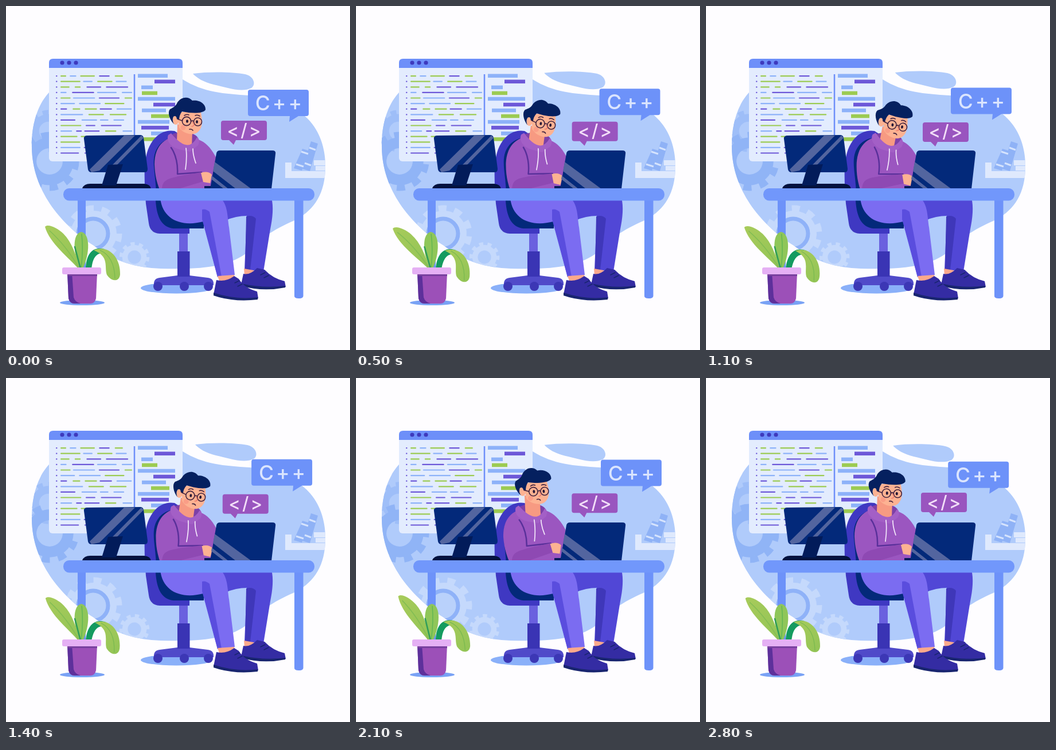
These frames come from a looping animation (600x600 px, 2900 ms). An HTML page:

```html
<!DOCTYPE html>
<html lang="en">
<head>
<meta charset="utf-8">
<title>Programmer at a desk</title>
<style>
  html, body { margin: 0; width: 100%; height: 100%; overflow: hidden; background: #fefdff; }
  svg { display: block; width: 100vw; height: 100vh; }
  text { font-family: Inter, "Liberation Sans", sans-serif; font-weight: 500; text-anchor: middle; }
  .line { fill: none; stroke-linecap: round; stroke-linejoin: round; }
</style>
</head>
<body>
<svg viewBox="0 0 600 600">
  <defs>
    <path id="blob" d="M45 247C44 198 61 143 112 128C175 105 255 108 308 128C345 151 380 153 425 156C528 166 557 223 557 280C557 330 535 358 503 374C462 392 447 404 418 432C382 458 330 459 270 458C215 456 182 440 152 417C98 383 46 323 45 247Z"/>
    <clipPath id="inBlob"><use href="#blob"/></clipPath>
    <g id="gear" fill="none" stroke="currentColor">
      <circle r="31" stroke-width="18"/>
      <circle r="44" stroke-width="11" pathLength="20" stroke-dasharray="1 1"/>
    </g>
    <linearGradient id="leafFill" x1="0" y1="0" x2="1" y2="1">
      <stop offset="0" stop-color="#a8cb5b"/><stop offset="1" stop-color="#92c456"/>
    </linearGradient>
  </defs>

  <use href="#blob" fill="#b0cbfb"/>
  <g clip-path="url(#inBlob)">
    <g transform="translate(74 218) scale(.74)" color="#9ebef8"><use href="#gear" class="gear" data-turn="-36"/></g>
    <g transform="translate(76 271) scale(1.04)" color="#90b4f6"><use href="#gear" class="gear" data-turn="36"/></g>
    <g transform="translate(153 397)" color="#c5d9fc"><use href="#gear" class="gear" data-turn="36"/></g>
    <circle cx="152" cy="397" r="26" fill="#b9d1fb" stroke="#8fb2f8" stroke-width="7"/>
    <g transform="translate(224 438) scale(.53)" color="#c5d9fc"><use href="#gear" class="gear" data-turn="-36"/></g>
    <g fill="#dfe9fd">
      <path d="M487 273H498V288H560V300H487Z"/>
      <path d="M537 269H560V278H537ZM540 279H560V287H540Z"/>
      <g fill="#8fb2f6">
        <path d="M517 249L530 253L516 287L502 283Z"/>
        <path d="M532 236L544 240L530 288L517 284Z"/>
      </g>
      <path d="M515 254L527 258M506 276L519 280M529 247L540 251M521 274L532 278" stroke="#d5e3fd" stroke-width="3"/>
    </g>
  </g>
  <path id="cloud" d="M326 118C355 114 397 115 417 119C432 122 437 137 428 143C410 152 382 141 362 137C345 133 332 125 326 118Z" fill="#b0cbfb"/>

  <rect x="75" y="96" width="233" height="175" rx="6" fill="#e3ecfe"/>
  <path d="M75 108V99Q75 92 82 92H301Q308 92 308 99V108Z" fill="#6d8ff9"/>
  <g fill="#3e3abd"><circle cx="98" cy="99" r="3.6"/><circle cx="110" cy="99" r="3.6"/><circle cx="122" cy="99" r="3.6"/></g>
  <path d="M224 119V260" stroke="#6d8ff9" stroke-width="2.5"/>
  <g id="code"></g>

  <g id="bigBubble">
    <path d="M426 146H524Q528 146 528 150V188Q528 192 524 192H510L494 202L495 192H426Q422 192 422 188V150Q422 146 426 146Z" fill="#6d92f9"/>
    <text x="477.5" y="182" font-size="35.5" letter-spacing="4" fill="#dbe5fe">C++</text>
  </g>
  <g id="smallBubble">
    <path d="M379 200H451Q455 200 455 204V230Q455 234 451 234H401L397 242L389 234H379Q375 234 375 230V204Q375 200 379 200Z" fill="#9955bf"/>
    <text x="416.5" y="227.5" font-size="31" letter-spacing="3" fill="#f2def8">&lt;/&gt;</text>
  </g>

  <!-- chair -->
  <ellipse cx="297" cy="492" rx="62" ry="9.5" fill="#8ab0f9"/>
  <path d="M302 392H317V432H302Z" fill="#6a60df"/>
  <path d="M258 487Q257 475 268 474L299 470H320L352 474Q363 475 362 487Z" fill="#504ac9"/>
  <rect x="299" y="428" width="21.500" height="44" fill="#3a34b4"/>
  <g fill="#3c37b5"><circle cx="265" cy="489" r="8"/><circle cx="311" cy="489" r="8"/><circle cx="353" cy="489" r="8"/></g>
  <path d="M244 345C241 302 239 268 250 245C260 224 277 215 294 218L320 235V397H268Q251 396 249 379Z" fill="#3f38c2"/>
  <path d="M261 340C265 305 251 273 262 251C268 238 281 229 297 230L310 240L345 376V388H292C272 386 263 369 261 340Z" fill="#03297a"/>

  <!-- person -->
  <g id="torsoBack"><path d="M284 232C284 216 336 215 336 235L320 252Z" fill="#7d40a7"/></g>
  <g id="head">
    <path d="M299 206L325 217L324 246Q309 253 298 236Z" fill="#f79a82"/>
    <path d="M298 186L339 181Q345 207 338 216C330 229 309 223 302 212Z" fill="#fdb292"/>
    <ellipse cx="296" cy="199" rx="5.5" ry="8" fill="#fdb292"/>
    <path d="M293 206C286 199 281 186 286 180C292 177 296 175 299 168C306 158 318 157 325 165C336 163 349 170 348 181C344 187 331 187 319 186L307 184Q302 190 302 199L298 197Q297 190 292 193Q289 199 293 206Z" fill="#05205f"/>
    <circle cx="309" cy="212" r="4.500" fill="#f89583" opacity=".7"/>
    <g class="line" stroke="#40233f" stroke-width="1.600">
      <circle cx="315" cy="201" r="7.600"/><circle cx="334.500" cy="202" r="7"/>
      <path d="M323 201Q325 199 327 201M307 200L299 197"/>
      <path d="M311 191Q315 188 319 190M330 191Q334 189 338 192"/>
      <path d="M320 215Q324 214 326 217"/>
    </g>
    <path d="M325 202Q331 209 324 210" class="line" stroke="#ef806e" stroke-width="1.600"/>
    <g fill="#261936"><ellipse cx="316" cy="201" rx="2" ry="2.800"/><ellipse cx="333" cy="202" rx="2" ry="2.800"/></g>
  </g>
  <g id="torso">
    <path d="M284 231C266 239 259 256 259 276C260 302 266 316 273 332H354L368 268C358 246 346 236 333 232C330 256 305 250 284 231Z" fill="#9b56c0"/>
    <path d="M283 225C279 235 287 246 302 250L321 254L335 243C338 236 337 230 333 229Q318 259 288 222Z" fill="#a35fc6"/>
    <path d="M288 247C297 260 300 278 299 293L341 290" class="line" stroke="#59309a" stroke-width="2.500"/>
    <path d="M273 330C268 302 283 302 300 297L340 290L344 306L304 318Z" fill="#8e49b3"/>
    <path d="M314 248Q316 265 313 285M326 249Q326 260 331 274" class="line" stroke="#f4e9fb" stroke-width="1.700"/>
    <path d="M340 291Q352 287 359 294L356 309L344 307Z" fill="#fdb292"/>
  </g>

  <!-- legs -->
  <path d="M368 335H463C467 350 465 370 461 389L449 463L416 460L420 366Q401 366 383 374Z" fill="#5147d6"/>
  <path d="M419 367L417 460H426L436 371Q430 364 419 367Z" fill="#3f37b9"/>
  <path d="M269 335H374C387 346 386 367 389 386L399 469L369 473L344 376C305 386 273 372 269 335Z" fill="#7b6cf1"/>
  <path d="M342 372L369 473L376 472L355 359Q348 353 342 355Z" fill="#5a4dde"/>
  <path d="M369 471L398 469L400 479L374 485ZM415 458L432 461L436 467L416 470Z" fill="#fba98c"/>
  <path d="M414 467Q425 470 438 457L451 460Q465 475 486 480L488 490Q450 497 410 486Z" fill="#342ca3"/>
  <path d="M410 484Q450 493 487 488V491Q447 499 410 488Z" fill="#18256f"/>
  <path d="M367 478Q383 482 398 471L406 476Q416 492 438 498L440 510Q396 516 362 503Z" fill="#342ca3"/>
  <path d="M362 500Q401 513 439 508V512Q397 517 362 505Z" fill="#18256f"/>
  <path d="M399 483L407 479M404 489L412 485M444 469L452 465M450 474L458 470" class="line" stroke="#18256f" stroke-width="1.500"/>

  <!-- screens and desk -->
  <path d="M133 318Q136 310 147 310H241Q252 311 253 319H133Z" fill="#02123f"/>
  <path d="M141 226L234 225Q239 225 240 230L247 284Q247 290 242 290H149Q144 290 143 285L136 232Q135 227 141 226Z" fill="#03297a"/>
  <path d="M206 226H225L163 287L149 290L146 285ZM236 226L240 230L182 289H174Z" fill="#53659f"/>
  <path d="M178 277L204 276L192 313H167Z" fill="#021b5a"/>
  <path d="M346 314H367V319H346Z" fill="#021b5a"/>
  <path d="M373 252H465Q471 252 470 258L463 319H356L367 257Q368 252 373 252Z" fill="#03297a"/>
  <path d="M364 272L361 288L401 319H428ZM359 296L358 302L380 319H388Z" fill="#53659f"/>
  <path d="M125 335H139V507H125ZM503 335H518.500V506Q518 510 511 510Q503 510 503 506Z" fill="#6d92f9"/>
  <rect x="100" y="318" width="438" height="21.500" rx="10" fill="#7197fb"/>

  <!-- plant -->
  <ellipse cx="133" cy="517.500" rx="39" ry="4.500" fill="#79a2f5"/>
  <g id="leftLeaf">
    <path d="M128 460C110 439 76 414 68 385C73 379 90 387 100 397C115 412 123 435 128 460Z" fill="url(#leafFill)"/>
    <path d="M76 392Q105 418 128 458" class="line" stroke="#82bd54" stroke-width="1.500"/>
  </g>
  <g id="rightLeaf">
    <path d="M139 460C139 433 151 418 172 424L178 433C159 427 151 437 149 460Z" fill="#159b60"/>
    <path d="M153 426C178 415 200 438 199 468C198 482 184 481 176 469C171 455 181 437 153 426Z" fill="url(#leafFill)"/>
    <path d="M164 426Q189 437 190 475" class="line" stroke="#78b950" stroke-width="1.200"/>
  </g>
  <g id="middleLeaf">
    <path d="M131 394C147 396 147 432 133 460H129C117 433 115 397 131 394Z" fill="#8fc659"/>
    <path d="M120 420L130 458" class="line" stroke="#2f9c5a" stroke-width="2.500"/>
    <path d="M132 398Q135 425 131 457" class="line" stroke="#62b653" stroke-width="1.500"/>
  </g>
  <path d="M107 465H159L157 510Q155 519 147 519H120Q111 519 109 510Z" fill="#9c50b8"/>
  <path d="M107 465H115L118 508Q120 516 130 519H120Q111 519 109 510Z" fill="#5d309b"/>
  <rect x="98" y="456" width="68" height="12" rx="3" fill="#e5b0f4"/>
  <path d="M107 468H159V471H107Z" fill="#78409f"/>
</svg>
<script>
const LOOP = 2900, STEP = 100;
const $ = id => document.getElementById(id);
const colors = { purple: '#6d58d8', blue: '#8db2f9', green: '#9ccb52' };

function bar(x, y, width, height, color) {
  return `<rect x="${x}" y="${y}" width="${width}" height="${height}" rx="${height < 4 ? 1 : 0}" fill="${colors[color]}"/>`;
}

function drawCode() {
  let seed = 11, html = '';
  const random = () => (seed = seed * 16807 % 2147483647) / 2147483647;
  for (let row = 0; row < 15; row++) {
    const y = 121 + row * 9.6;
    html += bar(87, y, 2.5, 2.2, 'purple');
    for (let x = 95; x < 210;) {
      const width = Math.min(10 + random() * 30, 220 - x);
      html += bar(x, y, width, 2.2, ['purple', 'green', 'blue'][Math.floor(random() * 3)]);
      x += width + 4 + random() * 7;
    }
  }
  const blocks = [[230, 52, 'blue'], [259, 36, 'purple'], [236, 20, 'blue'], [237, 27, 'green'],
    [230, 65, 'blue'], [257, 38, 'purple'], [237, 42, 'blue'], [253, 32, 'green'],
    [230, 55, 'blue'], [236, 48, 'purple'], [253, 30, 'blue'], [237, 25, 'green']];
  blocks.forEach(([x, width, color], i) => html += bar(x, 118.5 + i * 10.05, width, 6.5, color));
  $('code').innerHTML = html;
}

// Smooth periodic curve through [time, value] keys.
function curve(keys) {
  const n = keys.length;
  const key = i => {
    const lap = Math.floor(i / n), [t, v] = keys[i - lap * n];
    return [t + lap * LOOP, v];
  };
  const slope = i => {
    const [t0, v0] = key(i - 1), [t1, v1] = key(i + 1);
    return (v1 - v0) / (t1 - t0);
  };
  return t => {
    let i = n - 1;
    while (keys[i][0] > t) i--;
    const [t0, v0] = key(i), [t1, v1] = key(i + 1), d = t1 - t0, u = (t - t0) / d, w = 1 - u;
    return w * w * ((1 + 2 * u) * v0 + u * d * slope(i)) + u * u * ((3 - 2 * u) * v1 - w * d * slope(i + 1));
  };
}

const lean = curve([[0, 0], [300, 4], [700, 7.5], [1100, 9], [1700, 1.7], [2100, -5], [2400, -5], [2800, -.2]]);
const rise = curve([[0, 0], [300, 1.5], [700, 3.5], [1100, 5], [1650, 6.6], [2100, 5], [2800, .2]]);
const drift = curve([[0, 0], [300, 1], [700, 2.2], [1150, 3], [1700, 2.2], [2100, 1.3], [2800, 0]]);
const glide = curve([[0, 0], [300, 1.4], [700, 3], [1300, 4], [1700, 3.7], [2100, 2.6], [2800, .2]]);
const leftSway = curve([[0, 0], [300, -2.5], [600, -3.1], [1100, -1], [1700, 2.4], [2100, 4.2], [2800, .5]]);
const rightSway = curve([[0, 0], [300, 3], [700, 4.2], [1100, 5], [1700, 2], [2100, -1], [2800, 0]]);

const move = (id, x, y) => $(id).setAttribute('transform', `translate(${x} ${y})`);
const turn = (id, angle, x, y) => $(id).setAttribute('transform', `rotate(${angle} ${x} ${y})`);
const gears = document.querySelectorAll('.gear');

function draw(now) {
  const t = Math.floor(now % LOOP / STEP) * STEP;
  const angle = lean(t), up = rise(t), side = drift(t), float = glide(t);
  turn('head', angle, 280, 264);
  for (const id of ['torso', 'torsoBack']) turn(id, angle * .5, 300, 322);
  move('bigBubble', up, -up * .7);
  move('smallBubble', side, side);
  move('cloud', float, -float * .5);
  turn('leftLeaf', leftSway(t), 128, 458);
  turn('middleLeaf', leftSway(t) * .25, 131, 458);
  turn('rightLeaf', rightSway(t), 143, 458);
  for (const gear of gears) gear.setAttribute('transform', `rotate(${gear.dataset.turn * t / LOOP})`);
  requestAnimationFrame(draw);
}

drawCode();
requestAnimationFrame(draw);
</script>
</body>
</html>
```
